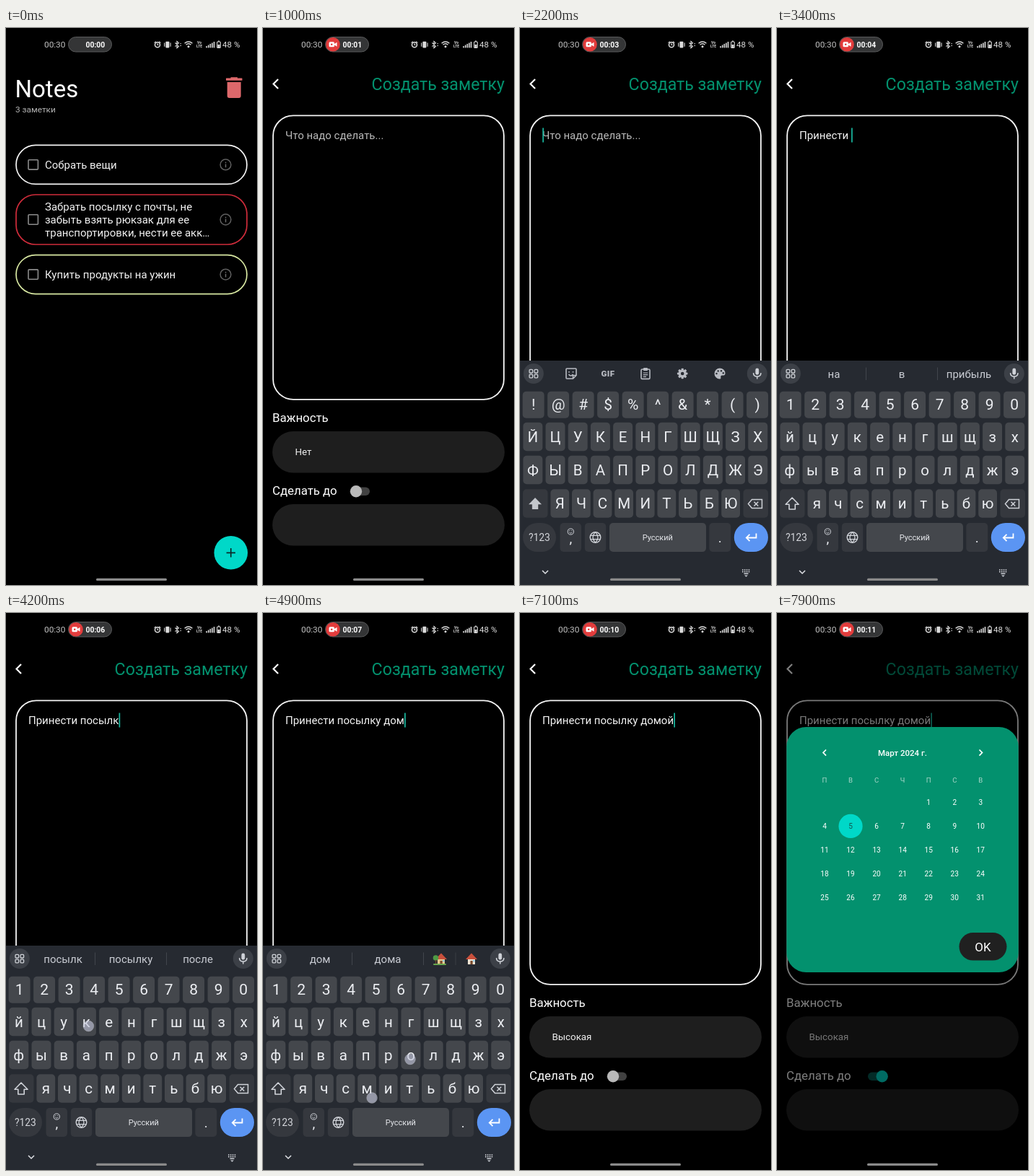
An HTML page for the animation above (8000 ms loop, 348 px wide and 772 px high).

```html
<!DOCTYPE html>
<html lang="ru">
<head>
<meta charset="utf-8">
<title>Notes</title>
<style>
html, body { margin: 0; width: 100%; height: 100%; overflow: hidden; background: #000; }
svg { display: block; width: 348px; height: 772px; }
text { font-family: Roboto, sans-serif; white-space: pre; }
</style>
</head>
<body>
<svg id="stage" viewBox="0 0 348 772" xmlns="http://www.w3.org/2000/svg"></svg>
<script>
const LOOP = 8000, CLOCK_RATE = 1.45;
const GREEN = '#03916e', TEAL = '#00d8c8', KEY = '#44474c', KEY_DARK = '#35383e';
const MESSAGE = 'Принести посылку домой';

// --- markup helpers
const rect = (x, y, w, h, r, fill, more = '') =>
  `<rect x="${x}" y="${y}" width="${w}" height="${h}" rx="${r}" fill="${fill}" ${more}/>`;
const circle = (x, y, r, fill, more = '') => `<circle cx="${x}" cy="${y}" r="${r}" fill="${fill}" ${more}/>`;
const line = (d, color, w = 1.5, more = '') =>
  `<path d="${d}" fill="none" stroke="${color}" stroke-width="${w}" ${more}/>`;
const shape = (d, fill) => `<path d="${d}" fill="${fill}"/>`;
const text = (x, y, size, str, fill = '#fff', more = '') =>
  `<text x="${x}" y="${y}" font-size="${size}" fill="${fill}" ${more}>${str}</text>`;
const MID = 'text-anchor="middle"', END = 'text-anchor="end"', ROUND = 'stroke-linecap="round" stroke-linejoin="round"';
const mid = (x, y, size, str, fill, more = '') => text(x, y, size, str.replace('&', '&amp;'), fill, MID + ' ' + more);
const group = (id, body, more = '') => `<g id="${id}" ${more}>${body}</g>`;
const outline = (x, y, w, h, r, color, sw) => rect(x, y, w, h, r, 'none', `stroke="${color}" stroke-width="${sw}"`);

// --- status bar
function statusBar() {
  const c = '#dcdcdc';
  let s = text(53, 27.2, 11.8, '00:30', '#c4c4c4');
  s += rect(86.5, 12.5, 60, 20.5, 10.2, '#343536', 'stroke="#5a5b5c"');
  s += group('rec', circle(97, 22.7, 9.8, '#e23c3c') + rect(91.5, 19.3, 7.5, 7, 1.5, '#fff') +
    shape('M99 22 L102.5 19.8 V25.8 L99 23.6Z', '#fff') + circle(95.2, 22.8, 1.3, '#e23c3c'));
  s += text(110.5, 26.5, 10.4, '00:00', '#fff', 'id="clock" font-weight="700"');
  s += circle(210, 23.2, 3.5, 'none', `stroke="${c}" stroke-width="1.6"`);
  s += line('M205.6 20.6 L207.8 18.7 M214.4 20.6 L212.2 18.7 M210 21.3 V23.5 H211.5', c, 1.2);
  s += rect(221.4, 18.8, 5, 8.6, 0.8, c) + line('M219.7 20.5 V25.7 M228.1 20.5 V25.7', c, 1.1);
  s += line('M234.5 20.5 L239.5 25.4 L237 27.7 V18.4 L239.5 20.7 L234.5 25.6 M241.5 21.7 H243 M241.5 24.5 H243', c, 1.1);
  s += line('M247.6 21.2 Q253 16.6 258.4 21.2 M249.5 23.3 Q253 20.3 256.5 23.3', c, 1.4) + circle(253, 25.8, 1.5, c);
  s += mid(268, 22.2, 5, 'Vo', c, 'font-weight="700"') + mid(268, 27, 5, 'LTE', c, 'font-weight="700"');
  for (let i = 0; i < 5; i++) s += rect(277.3 + i * 2.6, 25 - i * 1.5, 1.6, 2.4 + i * 1.5, 0.4, c);
  s += outline(292.7, 19, 4.6, 8.4, 1, c, 1.1) + rect(294, 17.6, 2, 1.2, 0, c) + rect(293.5, 23, 3, 4, 0, c);
  return s + text(300, 27.2, 11.6, '48 %', c);
}

// --- list of notes
function card(y, h, color, lines) {
  const cy = y + h / 2;
  let s = outline(14, y, 320, h, 27, color, 1.7) + outline(31, cy - 6.7, 13.4, 13.4, 1, '#8b8b8b', 1.6);
  s += circle(304.5, cy, 7.4, 'none', 'stroke="#5f5f5f" stroke-width="1.5"');
  s += rect(303.8, cy - 0.8, 1.5, 4.6, 0, '#6a6a6a') + rect(303.8, cy - 3.7, 1.5, 1.6, 0, '#6a6a6a');
  lines.forEach((l, i) => s += text(54, cy + 5.4 + (i - (lines.length - 1) / 2) * 17.6, 15, l, '#f2f2f2'));
  return s;
}
function listScreen() {
  const red = '#dd686b';
  return text(12.5, 96, 33, 'Notes') + text(13, 117.4, 11.8, '3 заметки', '#b5b5b5') +
    rect(305, 69.6, 22.5, 3.2, 0.5, red) + rect(311.5, 68.2, 9.5, 2.5, 0.5, red) +
    shape('M306.7 75 H325.7 V94 Q325.7 97 322.7 97 H309.7 Q306.7 97 306.7 94Z', red) +
    card(162.4, 54, '#f4f4f4', ['Собрать вещи']) +
    card(231, 69, '#cf2c3b', ['Забрать посылку с почты, не', 'забыть взять рюкзак для ее', 'транспортировки, нести ее акк…']) +
    card(314.6, 54, '#d8e8a2', ['Купить продукты на ужин']) +
    circle(311.8, 727.3, 23.3, TEAL) + circle(311.8, 727.3, 23.3, '#fff', 'id="ripple"') +
    line('M305.6 727.3 H318 M311.8 721.1 V733.5', '#0a2b2a', 1.7);
}

// --- note editor
function editScreen() {
  return line('M21 71 L14.5 77.5 L21 84', '#fff', 2.2) +
    text(335, 86, 23.2, 'Создать заметку', GREEN, END) +
    outline(14, 121.3, 320, 393.5, 28, '#f4f4f4', 1.8) +
    text(31, 154, 15, 'Что надо сделать...', '#b9b9b9', 'id="hint"') +
    text(31, 154, 15, '', '#f4f4f4', 'id="note" xml:space="preserve"') +
    rect(31.2, 138.5, 1.7, 20, 0, '#19b8a0', 'id="caret"') +
    text(13, 546, 16.8, 'Важность') + rect(13, 559, 322, 57.5, 28.7, '#1e1e1e') +
    text(44.5, 592.4, 13.3, 'Нет', '#f0f0f0', 'id="level"') +
    text(13, 647.2, 16.8, 'Сделать до') +
    rect(126, 636.5, 22, 11.5, 5.7, '#414141', 'id="track"') + circle(129, 642.3, 8.2, '#b9b9b9', 'id="thumb"') +
    rect(13, 660, 322, 57.5, 28.7, '#1e1e1e');
}
function levelMenu() {
  return rect(34, 560, 300, 116, 3, '#424242') +
    ['Нет', 'Низкая', 'Высокая'].map((s, i) => text(44.5, 584 + i * 38.6, 13.3, s)).join('');
}

// --- keyboard
const keyAt = { ' ': [190, 706] };
function keyRow(chars, y, h, x0, pitch, w, size, alt) {
  let keys = '', low = '', up = '';
  [...chars].forEach((ch, i) => {
    const x = x0 + i * pitch;
    keyAt[ch] = [x, y];
    keys += rect(x - w / 2, y - h / 2, w, h, 5, KEY);
    low += mid(x, y + 7, size, ch, '#eceef2');
    up += mid(x, y + 7, size, alt ? alt[i] : ch.toUpperCase(), '#eceef2');
  });
  return [keys, low, up];
}
function toolbar() {
  const c = '#b9bcc3';
  let teeth = '';
  for (let a = 0; a < 360; a += 45) teeth += rect(223.6, 471.8, 3.2, 4, 0.8, c, `transform="rotate(${a} 225.2 479)"`);
  return line('M64 473 Q64 472 65 472 H77 Q78 472 78 473 V481.5 L73.5 486 H65 Q64 486 64 485Z M78 481.5 H73.5 V486 M67.5 480 Q70.5 484 73.5 480 M68 476 V477.5 M73.5 476 V477.5', c, 1.6) +
    mid(122, 483.2, 11.5, 'GIF', c, 'font-weight="900" letter-spacing="0.5"') +
    outline(168, 473, 12, 13.4, 1.5, c, 1.6) + rect(171, 471, 6, 4, 1, c) +
    line('M170.8 478 H177.2 M170.8 480.7 H177.2 M170.8 483.3 H175', c, 1.2) +
    teeth + circle(225.2, 479, 3.9, 'none', `stroke="${c}" stroke-width="3.2"`) +
    shape('M277 471.5 A7.5 7.5 0 1 0 277 486.5 Q279 486 278.3 483.5 Q278 481.5 280 481.5 H282 Q284.5 481.5 284.5 478.5 A7.5 7 0 0 0 277 471.5Z', c) +
    [[272.5, 479], [274.7, 475.4], [279, 475.2], [281.8, 478.3]].map(p => circle(...p, 1.2, '#262a31')).join('');
}
const house = (x, wall) => rect(x - 5, 479, 10, 8, 0.5, wall) + shape(`M${x - 8} 480 L${x} 471.5 L${x + 8} 480Z`, '#c9503c') +
  rect(x - 1.5, 482, 3.2, 5, 0, '#7a4a2c') + rect(x + 2.4, 481, 2, 2.4, 0, '#7fc4ea');
function suggestBar() {
  const c = '#c9ccd3';
  return line('M123.5 470.5 V488 M222.5 470.5 V488', '#42464d', 1) +
    [79, 173, 266].map((x, i) => mid(x, 484.5, 15, '', c, `id="word${i}"`)).join('') +
    group('homes', line('M267 470.5 V488', '#3a3e45', 1) + house(247, '#e9c98e') + circle(239.5, 478, 3.8, '#4f9a45') +
      rect(239, 481, 1.4, 5, 0, '#70482b') + rect(236, 486, 18, 2, 1, '#69a84f') + house(289, '#efe3d2'));
}
function keyboard() {
  const ink = '#cfd2d8';
  const rows = [
    keyRow('1234567890', 522.2, 37, 18.6, 34.5, 30, 21, '!@#$%^&*()'),
    keyRow('йцукенгшщзх', 566.5, 39.5, 17.8, 31.2, 27, 20.5),
    keyRow('фывапролджэ', 612.5, 39.5, 17.8, 31.2, 27, 20.5),
    keyRow('ячсмитьбю', 659, 39.5, 55.3, 29.6, 25.8, 20.5)
  ];
  const part = i => rows.map(r => r[i]).join('');
  const arrow = 'M21 651 L30 660.2 H25.2 V667 H16.8 V660.2 H12Z';
  return rect(0, 461, 348, 311, 0, '#262a31') +
    circle(18.8, 479, 14, '#3c4047') + circle(328.8, 479, 14, '#3c4047') +
    [[13, 473.4], [20, 473.4], [13, 480.2], [20, 480.2]].map(p => outline(...p, 4.6, 4.6, 1, ink, 1.3)).join('') +
    rect(326.4, 471.5, 4.8, 9.2, 2.4, ink) + line('M323.6 478 Q323.6 483 328.8 483 Q334 483 334 478 M328.8 483 V486.5', ink, 1.5) +
    group('tools', toolbar()) + group('suggest', suggestBar()) + part(0) +
    rect(4, 639.3, 34.5, 39.5, 5, KEY_DARK) + rect(309.5, 639.3, 34.5, 39.5, 5, KEY_DARK) +
    line('M321.5 653.5 H335.5 V665.5 H321.5 L316.5 659.5Z M324.5 656.7 L330.3 662.5 M330.3 656.7 L324.5 662.5', ink, 1.5) +
    group('lower', part(1) + line(arrow, ink, 1.6, ROUND)) +
    group('upper', part(2) + shape(arrow, '#c3c6cc')) +
    rect(4, 686, 46, 40, 20, KEY_DARK) + mid(27, 711, 13.8, '?123', '#d4d6db') +
    rect(55.5, 686, 29.5, 40, 5, KEY_DARK) + mid(70.3, 714, 19, ',', '#eceef2') +
    circle(70.3, 698, 4.1, 'none', `stroke="${ink}" stroke-width="1"`) +
    line('M68.3 699 Q70.3 701.5 72.3 699 M68.8 696 V697.2 M71.8 696 V697.2', ink, 0.9) +
    rect(89.8, 686, 29.5, 40, 5, KEY_DARK) + circle(104.5, 706, 7.3, 'none', `stroke="${ink}" stroke-width="1.4"`) +
    line('M104.5 698.7 Q97.5 706 104.5 713.3 Q111.5 706 104.5 698.7 M98 703.4 H111 M98 708.6 H111', ink, 1.2) +
    rect(124, 686, 134, 40, 5, KEY) + mid(190.8, 710, 11, 'Русский', '#e4e6ea') +
    rect(262.3, 686, 30, 40, 5, KEY_DARK) + mid(277.3, 713, 19, '.', '#eceef2') +
    rect(296.8, 686, 47.2, 40, 20, '#5b95f3') + line('M327.5 700.5 V706.5 H314 M318.5 701.8 L313.8 706.5 L318.5 711.2', '#fff', 1.8) +
    line('M31 752 L35 756 L39 752', '#e0e2e6', 1.5) +
    [0, 1].map(j => line(`M308 ${751 + j * 2.6} H319`, ink, 1.6, 'stroke-dasharray="1.6 1.3"')).join('') +
    line('M310.5 756.3 H316.5', ink, 1.5) + shape('M311 758.5 H316 L313.5 760.8Z', ink);
}

// --- date dialog
function calendar() {
  const colX = i => 66 + 36.05 * i, rowY = i => 262.5 + 32.9 * i;
  let s = rect(13.3, 158, 321.4, 340, 27, GREEN) + mid(174, 197.5, 11.5, 'Март 2024 г.', '#fff', 'font-weight="500"') +
    line('M68 189.5 L64 193.6 L68 197.7 M280.5 189.5 L284.5 193.6 L280.5 197.7', '#fff', 1.7) + circle(colX(1), rowY(1), 16.6, TEAL);
  [...'ПВСЧПСВ'].forEach((d, i) => s += mid(colX(i), 234.8, 9.6, d, '#a9d8cb'));
  for (let d = 1; d <= 31; d++) {
    const n = d + 3;
    s += mid(colX(n % 7), rowY(n / 7 | 0) + 3.6, 10.1, String(d), d === 5 ? '#10574f' : '#fff');
  }
  return s + rect(252.5, 443, 66, 38.6, 19.3, '#202020') + mid(285.5, 468.6, 17, 'OK', '#fff');
}

const stage = document.getElementById('stage');
stage.innerHTML = group('list', listScreen()) + group('edit', editScreen()) + group('menu', levelMenu()) +
  rect(0, 40, 348, 720, 0, '#000', 'id="dim"') + group('dialog', calendar()) + group('keys', keyboard()) +
  rect(125, 762.8, 98, 3.2, 1.6, '#8a8a8a') + statusBar() +
  group('taps', Array(4).fill(circle(0, 0, 7.4, '#c5c8dd', 'stroke="#fff" stroke-opacity=".35"')).join(''));
const el = {};
stage.querySelectorAll('[id]').forEach(n => el[n.id] = n);

// --- timeline
const typedAt = [...MESSAGE].map((_, i) =>
  i < 9 ? 2350 + i * 115 : i < 17 ? 3550 + (i - 9) * 120 : 4670 + (i - 17) * 105);
const taps = [...MESSAGE.toLowerCase()].map((ch, i) => {
  const [x, y] = keyAt[ch];
  return [typedAt[i] - 60, typedAt[i] + 130, x + i * 8 % 9 - 1, y + 6 + i % 2 * 7];
});
taps.push([380, 530, 313, 730], [1180, 1320, 168, 252], [5480, 5610, 36, 755],
  [6330, 6450, 176, 590], [6850, 6980, 120, 660], [7300, 7400, 136, 643]);

const nextWords = [['на', 'в', 'прибыль'], ['на', 'в', 'с']];
const guesses = [['Принести', 'Привет'], ['посылку', 'после'], ['домой', 'дома']];
function suggestions(str) {
  const words = str.split(' '), n = words.length - 1, w = words[n];
  if (!w) return nextWords[n - 1];
  if (w === 'дом') return ['дом', 'дома', ''];
  const [full, other] = guesses[n];
  return w === full ? [w, other, w + ' и'] : [w, full, other];
}

const ramp = (t, a, b) => Math.min(1, Math.max(0, (t - a) / (b - a)));
const ease = p => 1 - (1 - p) ** 3;
const set = (id, attrs) => { for (const k in attrs) el[id].setAttribute(k, attrs[k]); };
const alpha = (id, v) => set(id, { opacity: v, visibility: v > 0 ? 'visible' : 'hidden' });
const put = (id, str) => { if (el[id].textContent !== str) el[id].textContent = str; };

function draw(t) {
  put('clock', '00:' + String(Math.floor(t * CLOCK_RATE / 1000)).padStart(2, '0'));
  alpha('rec', ramp(t, 60, 200));
  alpha('ripple', t > 380 ? 0.3 * (1 - ramp(t, 480, 650)) : 0);

  const swap = ramp(t, 550, 780);
  alpha('list', 1 - swap);
  alpha('edit', swap);

  const str = MESSAGE.slice(0, typedAt.filter(a => a <= t).length);
  put('note', str);
  alpha('hint', str ? 0 : 1);
  const typing = typedAt.some(a => t >= a && t < a + 350);
  const blink = ((t - 7100 + LOOP * 7) % 700 + 700 - LOOP * 7 % 700) % 700 < 350;
  alpha('caret', t > 1400 && (typing || blink) ? 1 : 0);
  set('caret', { x: 31.2 + (str ? el.note.getComputedTextLength() : 0) });

  const shown = ease(ramp(t, 1450, 1750)) - ramp(t, 5600, 5880) ** 2;
  set('keys', { transform: `translate(0 ${311 * (1 - shown)})` });
  alpha('keys', shown > 0 ? 1 : 0);
  el.upper.style.display = str ? 'none' : '';
  el.lower.style.display = str ? '' : 'none';
  el.tools.style.display = str ? 'none' : '';
  el.suggest.style.display = str ? '' : 'none';
  el.homes.style.display = str.endsWith(' дом') ? '' : 'none';
  if (str) suggestions(str).forEach((w, i) => put('word' + i, w));

  alpha('menu', ramp(t, 6420, 6560) - ramp(t, 6960, 7080));
  put('level', t >= 6950 ? 'Высокая' : 'Нет');

  const on = ease(ramp(t, 7340, 7500));
  set('thumb', { cx: 129 + 16.7 * on, fill: on > 0.4 ? TEAL : '#b9b9b9' });
  set('track', { fill: on > 0.4 ? '#06564f' : '#414141' });
  const open = ease(ramp(t, 7400, 7590)), k = 0.9 + 0.1 * open;
  alpha('dim', 0.5 * open);
  alpha('dialog', open);
  set('dialog', { transform: `translate(174 328) scale(${k}) translate(-174 -328)` });

  const live = taps.filter(p => t >= p[0] && t < p[1]);
  [...el.taps.children].forEach((c, i) => {
    const p = live[i];
    c.setAttribute('visibility', p ? 'visible' : 'hidden');
    if (!p) return;
    c.setAttribute('cx', p[2]);
    c.setAttribute('cy', p[3]);
    c.setAttribute('opacity', 0.62);
  });
}

const start = performance.now();
function tick() {
  draw((performance.now() - start) % LOOP);
  requestAnimationFrame(tick);
}
tick();
</script>
</body>
</html>
```
